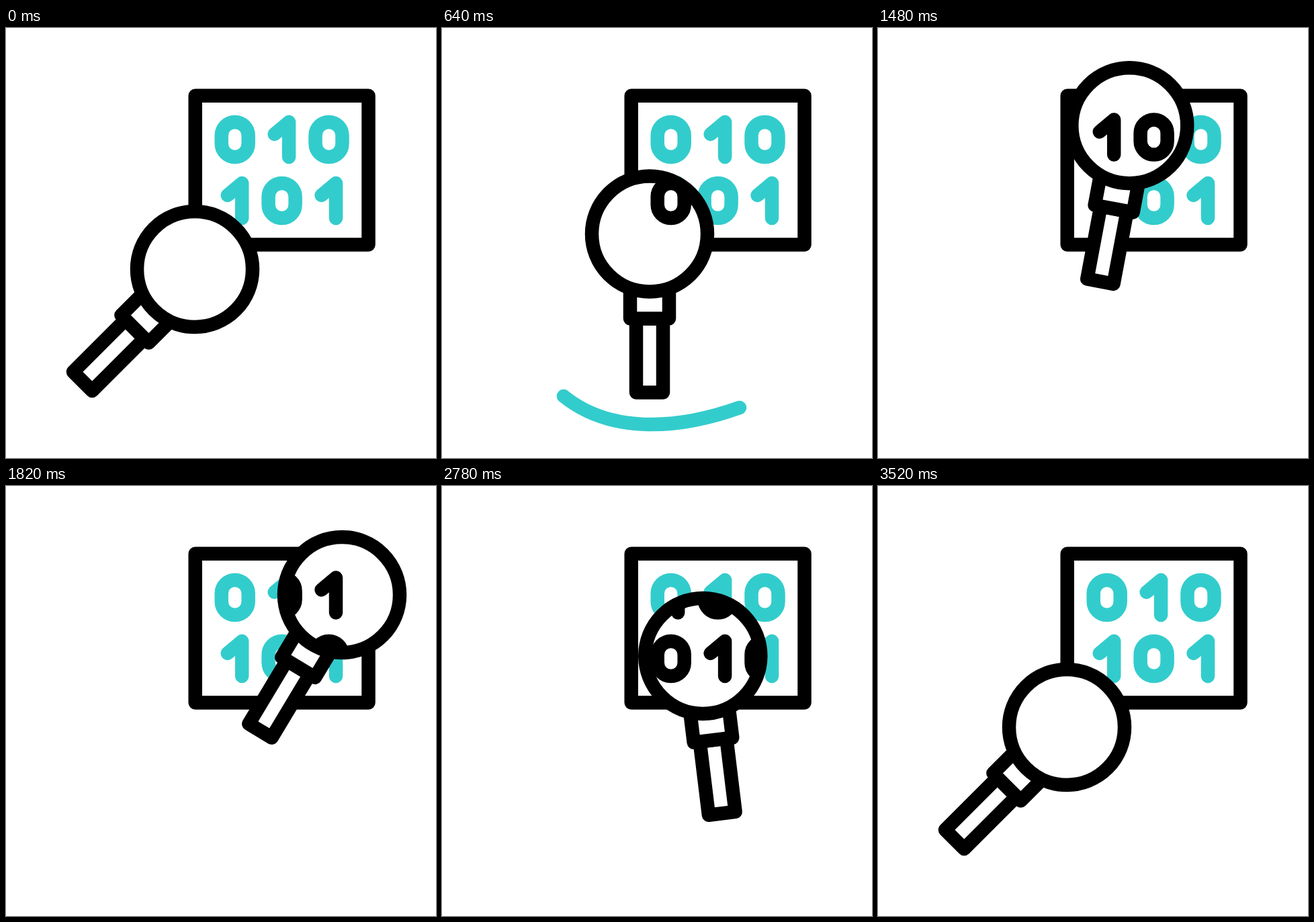
An HTML page for the animation above (3.6 s loop, 640 px wide and 640 px high).

```html
<!DOCTYPE html>
<html lang="en">
<head>
<meta charset="utf-8">
<title>Binary search</title>
<style>
  html, body { margin: 0; height: 100%; overflow: hidden; background: #fff; }
  svg { display: block; width: 100vw; height: 100vh; }
  .line { fill: none; stroke-width: 20.5; stroke-linecap: round; stroke-linejoin: round; }
  .ink { stroke: #000; }
  .teal { stroke: #33cccc; }
  .solid { fill: #fff; }
</style>
</head>
<body>
<svg viewBox="0 0 640 640">
  <defs>
    <rect id="d0" x="-20" y="-26" width="40" height="52" rx="20"/>
    <path id="d1" d="M-11-8L10.500-26V26"/>
    <clipPath id="view"><circle id="hole" r="86"/></clipPath>
  </defs>
  <rect class="line ink" x="281.7" y="100.7" width="257.8" height="221.8"/>
  <g id="code" class="line teal"></g>
  <path id="swoosh" class="line teal" pathLength="1"
    d="M139 502Q157 528 181 548C248 602 345 600 443 565Q473 554 500 540"/>
  <g id="handle" class="line ink">
    <rect class="solid" x="-20" y="126" width="40" height="110"/>
    <path class="solid" d="M-29 80V126H29V80"/>
  </g>
  <circle id="glass" r="86" fill="#fff"/>
  <g clip-path="url(#view)"><g id="flipped" class="line ink"></g></g>
  <circle id="ring" class="line ink" r="86"/>
</svg>
<script>
const LOOP = 3600, STEP = 20;
const $ = id => document.getElementById(id);

// Each move eases the lens from wherever it rests to a new place and tilt.
const home = { x: 281, y: 359, tilt: 45 };
const moves = [
  { from: 220, to: 560, x: 309, y: 315.5, tilt: 0 },
  { from: 560, to: 1140, x: 309, y: 143, tilt: 0 },
  { from: 1260, to: 1820, x: 500, y: 162, tilt: 31, bend: 2 },
  { from: 2000, to: 2480, x: 504, y: 277.5, tilt: 31 },
  { from: 2480, to: 2960, x: 334.7, y: 241.7, tilt: -24.5 },
  { from: 3040, to: 3520, ...home }
];

const mix = (a, b, s) => a + (b - a) * s;

function ease(t, from, to) {
  const u = Math.min(1, Math.max(0, (t - from) / (to - from)));
  return u * u * (3 - 2 * u);
}

function pose(t) {
  return moves.reduce((p, m) => {
    const s = ease(t, m.from, m.to);
    return {
      x: mix(p.x, m.x, s),
      y: mix(p.y, m.y, s ** (m.bend ?? 1)),
      tilt: mix(p.tilt, m.tilt, s)
    };
  }, home);
}

function digitRow(row, y) {
  return [...row].map((d, i) => `<use href="#d${d}" x="${340.7 + 69.9 * i}" y="${y}"/>`).join("");
}

function drawSwoosh(t) {
  const tail = ease(t, 560, 880), head = ease(t, 400, 720);
  const style = $("swoosh").style;
  style.visibility = head > tail ? "visible" : "hidden";
  style.strokeDasharray = `${head - tail} 2`;
  style.strokeDashoffset = -tail;
}

function drawLens({ x, y, tilt }) {
  for (const id of ["hole", "glass", "ring"]) {
    $(id).setAttribute("cx", x);
    $(id).setAttribute("cy", y);
  }
  $("handle").setAttribute("transform", `translate(${x} ${y}) rotate(${tilt})`);
}

$("code").innerHTML = digitRow("010", 166) + digitRow("101", 257);
$("flipped").innerHTML = digitRow("101", 162.5) + digitRow("010", 257);

const start = performance.now();
function tick() {
  const now = (performance.now() - start) % LOOP;
  const t = Math.floor(now / STEP) * STEP;
  drawSwoosh(t);
  drawLens(pose(t));
  requestAnimationFrame(tick);
}
tick();
</script>
</body>
</html>
```
